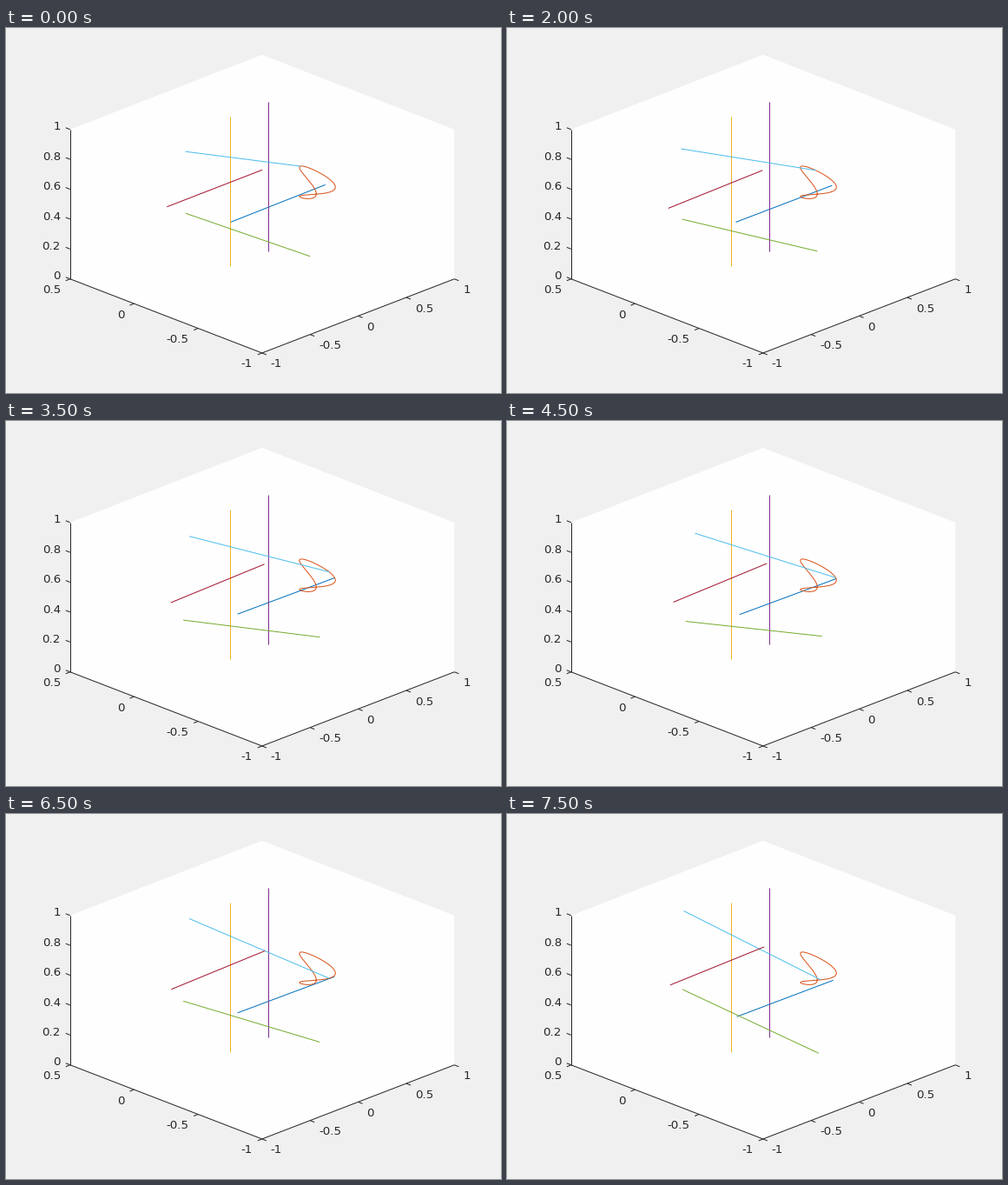
A matplotlib script for the animation above (8 s loop, 570x420 px).

```python
import numpy as np
import matplotlib.pyplot as plt
from matplotlib.animation import FuncAnimation

W, H, DPI = 570, 420, 100
FRAMES, STEP_MS = 16, 500
TURN = 40  # steps for one full lap of the tool path
PX = 72 / DPI
INK = "#262626"
BLUE, ORANGE, YELLOW, PURPLE = "#0072BD", "#D95319", "#EDB120", "#7E2F8E"
GREEN, CYAN, RED = "#77AC30", "#4DBEEE", "#A2142F"

plt.rcParams["font.family"] = "DejaVu Sans"
fig = plt.figure(figsize=(W / DPI, H / DPI), dpi=DPI, facecolor="#f0f0f0")
ax = fig.add_axes([0, 0, 1, 1])
ax.set_xlim(0.2, W + 0.2)
ax.set_ylim(H - 0.25, -0.25)
ax.axis("off")


def line(xs, ys, color, z=2):
    return ax.plot(xs, ys, color=color, lw=PX, zorder=z,
                   solid_capstyle="butt")[0]


def label(x, y, text, ha):
    ax.text(x, y + 4, text, ha=ha, va="baseline", color=INK, fontsize=13.33 * PX)


# Axes box
LEFT, MID, RIGHT = 74, 295, 516.5
TOP, LOW, FRONT = 116.5, 288.5, 373.7
ax.fill([MID, RIGHT, RIGHT, MID, LEFT, LEFT], [30.5, TOP, LOW, FRONT, LOW, TOP],
        color="#fefefe", lw=0, zorder=0)
line([LEFT, LEFT], [TOP, LOW], INK)
line([LEFT, MID, RIGHT], [LOW, FRONT, LOW], INK)

for i in range(6):
    y = LOW + (TOP - LOW) * i / 5
    line([LEFT, LEFT - 5], [y, y - 2], INK)
    label(LEFT - 10.9, y - 3.3, f"{i / 5:g}", "right")
for i in range(4):
    x, y = LEFT + (MID - LEFT) * i / 3, LOW + (FRONT - LOW) * i / 3
    line([x, x - 5], [y, y + 2], INK)
    label(x - 10.9, y + 12.5, f"{0.5 - i / 2:g}", "right")
for i in range(5):
    x, y = MID + (RIGHT - MID) * i / 4, FRONT + (LOW - FRONT) * i / 4
    line([x, x + 5], [y, y + 2], INK)
    label(x + 9.8, y + 12.5, f"{-1 + i / 2:g}", "left")


def tip(phi):
    """Tool path on screen: x ~ sin, y ~ cos 2phi, z ~ cos."""
    c, s, c2 = np.cos(phi), np.sin(phi), np.cos(2 * phi)
    return 353.8 + 11 * s - 14.7 * c2, 181.3 - 17 * c - 3.9 * s - 5.5 * c2


def pose(phi):
    """Both ends of the blue, green, cyan and red rods, swaying with the tool."""
    c, s = np.cos(phi), np.sin(phi)
    c2, s2 = np.cos(2 * phi), np.sin(2 * phi)

    bx, by = 259 + 8.3 * s - 0.8 * c2, 225.2 - 7.3 * c + 3.7 * s + 5.5 * c2
    rx, ry = 192.7 - 0.6 * c - 7.2 * s - 6.6 * c2, 202.6 + 8 * c - 0.5 * s - 5.1 * c2
    gx, gy = 216.8 - 20.4 * s - 9.7 * c2, 215.2 + 15.2 * c - 3.9 * s - 17.4 * c2
    hx, hy = 351.3 + 10.9 * s - 0.9 * c2, 261.2 - 15.2 * c + 4.3 * s + 16.5 * c2
    cx = 232.3 - 40.5 * s - 25.5 * c2
    cy = 100.8 + 34.9 * c + 32.7 * s + 6.2 * c2 - 12 * s2

    return (((bx, by), (bx + 109.7 + 2 * s, by - 43.3 + 1.9 * s)),
            ((gx, gy), (hx, hy)),
            ((cx, cy), tip(phi)),
            ((rx, ry), (rx + 109.8 - 2.2 * s, ry - 42.5 - 2 * s)))


line(*tip(np.linspace(0, 2 * np.pi, 200)), ORANGE, 4)
line([258, 258], [102, 273.5], YELLOW, 5)
line([302, 302], [85, 256.5], PURPLE, 5)
rods = [line([], [], color, z)
        for color, z in ((BLUE, 3), (GREEN, 6), (CYAN, 7), (RED, 8))]


def update(i):
    for rod, ends in zip(rods, pose(2 * np.pi * i / TURN)):
        rod.set_data(*zip(*ends))
    return rods


anim = FuncAnimation(fig, update, frames=FRAMES, interval=STEP_MS,
                     repeat=True, repeat_delay=0, blit=False)
plt.show()
```
